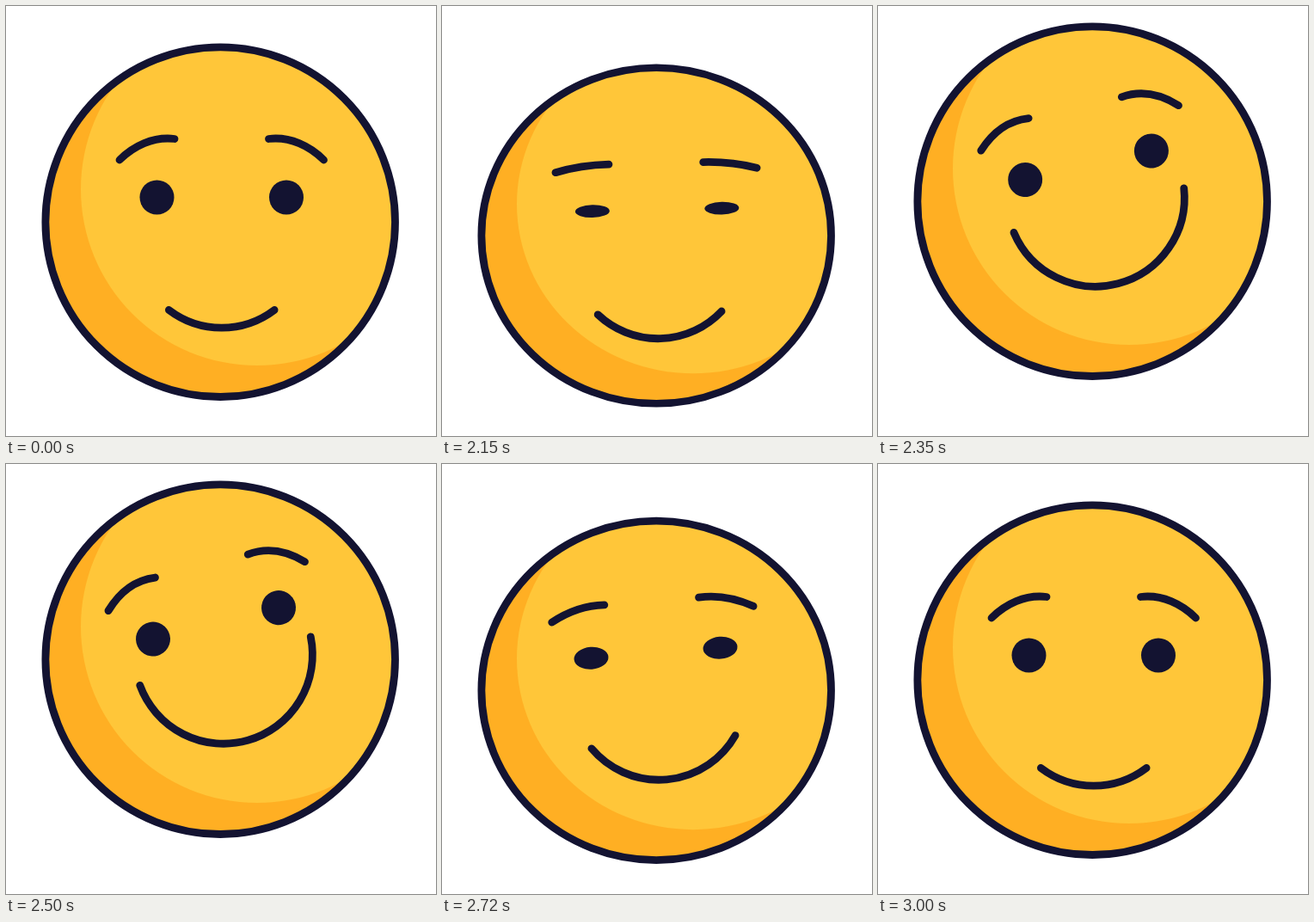
Recreate the animation shown at these times as an HTML page. Size 500 by 500 pixels, loop 3.52 s.

```html
<!DOCTYPE html>
<html lang="en">
<head>
<meta charset="utf-8">
<title>Smiling face</title>
<style>
  html, body { margin: 0; width: 100%; height: 100%; overflow: hidden; background: #fff; }
  svg { display: block; width: 100vw; height: 100vh; }
  .line { fill: none; stroke: #131331; stroke-width: 8.8; stroke-linecap: round; }
  .eye { fill: #131331; }
</style>
</head>
<body>
<svg viewBox="0 0 500 500">
  <defs>
    <clipPath id="disc"><circle r="203.3"/></clipPath>
  </defs>
  <g id="body">
    <circle r="203.3" fill="#ffaf23"/>
    <circle cx="42.8" cy="-38.2" r="205" fill="#ffc639" clip-path="url(#disc)"/>
    <circle r="203.3" class="line"/>
  </g>
  <g id="face">
    <ellipse class="eye" cx="-75.25" cy="-27.9" rx="20"/>
    <ellipse class="eye" cx="75.25" cy="-27.9" rx="20"/>
    <path class="line brow"/>
    <path class="line brow" transform="scale(-1 1)"/>
    <path class="line" id="mouth"/>
  </g>
</svg>
<script>
const LOOP = 3520, STEP = 25, FACE_LAG = 21;

const body = document.getElementById('body');
const face = document.getElementById('face');
const mouth = document.getElementById('mouth');
const eyes = document.querySelectorAll('.eye');
const brows = document.querySelectorAll('.brow');

// Eased 0 to 1 between two times.
function ramp(t, from, to) {
  const u = Math.min(1, Math.max(0, (t - from) / (to - from)));
  return u * u * (3 - 2 * u);
}

// Up, stay, down again.
const hold = (t, a, b, c, d) => ramp(t, a, b) - ramp(t, c, d);
const bump = (t, a, peak, b) => hold(t, a, peak, peak, b);

// The ball dips, rises, dips again on landing and settles.
const rise = t => hold(t, 2105, 2300, 2580, 2765);
const dip = t => bump(t, 2000, 2125, 2235) + bump(t, 2650, 2770, 2843);
const tilt = t => 14 * hold(t, 2090, 2405, 2580, 2815);
const smile = t => hold(t, 2060, 2415, 2514, 2873);
const squint = t => 1.5 * (bump(t, 2030, 2140, 2295) + bump(t, 2650, 2790, 2880));

function browPath(q, s) {
  const x0 = -118.75 + q + s, y0 = -71.4 - 1.5 * q - s;
  const x1 = -54.75 - .8 * s, y1 = -95.9 + 9.5 * q - .8 * s;
  return `M${x0} ${y0} C${x0 + 16 + 3 * q} ${y0 - 16 + 7 * q} ` +
    `${x1 - 25 + 4 * q} ${y1 - 3 + 2 * q} ${x1} ${y1}`;
}

// An arc of nearly constant radius that opens as the smile grows.
function mouthPath(s) {
  const r = 101.5 + 2 * s, cy = 22.2 - 12.6 * s;
  const a = (37.2 + 48.6 * s) * Math.PI / 180;
  const x = r * Math.sin(a), y = cy + r * Math.cos(a);
  return `M${-x} ${y} A${r} ${r} 0 0 0 ${x} ${y}`;
}

function draw(t) {
  const up = rise(t), down = dip(t);
  const bodyY = 22 * down - 24 * up;
  const stretch = 19.2 * up * (1 - up) - 12 * down;
  body.setAttribute('transform',
    `translate(249.2 ${251.2 + bodyY}) scale(1 ${1 + stretch / 207.5})`);

  const late = t - FACE_LAG;
  const faceY = 16 * dip(late) - 38 * rise(late);
  const turn = tilt(t), s = smile(t), q = squint(t);
  face.setAttribute('transform',
    `translate(250.75 ${250.4 + faceY}) rotate(${-turn})`);
  eyes.forEach(e => e.setAttribute('ry', 20 - 8.5 * q));
  brows.forEach(b => b.setAttribute('d', browPath(q, s)));
  mouth.setAttribute('d', mouthPath(s));
  mouth.setAttribute('transform', `rotate(${-.135 * turn} 0 15)`);
}

// The pose advances in 25 ms steps that land on 10 ms ticks.
function tick() {
  const tens = Math.floor((performance.now() % LOOP) / 10) * 10;
  draw(Math.floor((tens + 9) / STEP) * STEP);
  requestAnimationFrame(tick);
}
tick();
</script>
</body>
</html>
```
